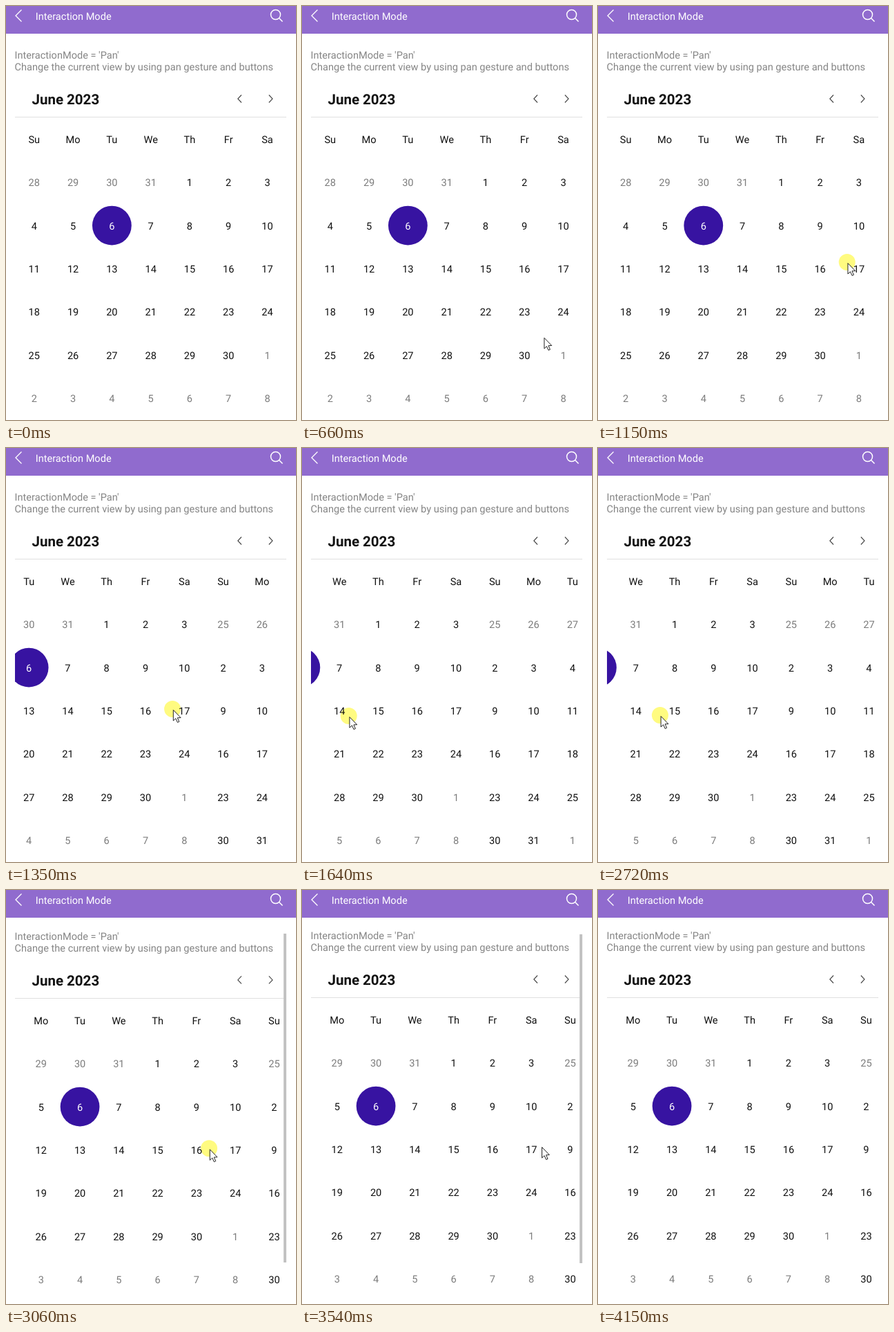
These frames come from a looping animation (420 px wide and 598 px high, 4.62 s). An HTML page with a canvas:

```html
<!DOCTYPE html>
<html lang="en">
<head>
<meta charset="utf-8">
<title>Calendar pan</title>
<style>
html, body { margin: 0; width: 100%; height: 100%; overflow: hidden; background: #fff; }
canvas { display: block; }
</style>
</head>
<body>
<canvas width="420" height="598"></canvas>
<script>
const ctx = document.querySelector('canvas').getContext('2d');
ctx.textRendering = 'geometricPrecision';

const LOOP = 4620, LEFT = 13, WIDTH = 393, COL = 56.28, ROW = 62.3;
const REGULAR = '14.57px Roboto, sans-serif', BOLD = 'bold 20.5px Roboto, sans-serif';
const INK = '#111', MUTED = '#7c7c7c', CAPTION = '#858585';
const ARROW = new Path2D('M.5 .5V16L4 12.7L6.6 18.4L9 17.3L6.5 11.8L11.3 11.6Z');

// Progress from 0 to 1 between two times
const ramp = (t, start, end) => Math.min(1, Math.max(0, (t - start) / (end - start)));

// Enter, drag left, return, drag right, leave
const pointerX = t => 341 + 21 * ramp(t, 380, 1010) - 354 * ramp(t, 1150, 1742)
  + 82 * ramp(t, 2150, 2580) + 257 * ramp(t, 2720, 3148) - 17 * ramp(t, 3670, 4150);
const pointerY = t => 597 - 206 * ramp(t, 380, 870) - 20 * ramp(t, 870, 1010)
  + 25 * ramp(t, 1150, 1870) - 9 * ramp(t, 2150, 2580) - 16 * ramp(t, 2720, 3148)
  + 229 * ramp(t, 3670, 4150);

// Each pan follows the pointer until vertical scrolling takes over the gesture
const panX = t => -155.5 * ramp(t, 1150, 1410) + 109.2 * ramp(t, 2720, 2902);
const scrollY = t => -5 * ramp(t, 2902, 3100);
const barAlpha = t => ramp(t, 2902, 2970) * (1 - ramp(t, 3700, 4000));

function text(str, x, y, color, align = 'left', font = REGULAR) {
  ctx.font = font;
  ctx.fillStyle = color;
  ctx.textAlign = align;
  ctx.fillText(str, x, y);
}

function disc(x, y, r, color) {
  ctx.fillStyle = color;
  ctx.beginPath();
  ctx.arc(x, y, r, 0, 2 * Math.PI);
  ctx.fill();
}

function box(x, y, w, h, color) {
  ctx.fillStyle = color;
  ctx.fillRect(x, y, w, h);
}

function stroke(path, color, width) {
  ctx.strokeStyle = color;
  ctx.lineWidth = width;
  ctx.stroke(new Path2D(path));
}

// Arrowhead with its tip at x, opening by dx and dy
function chevron(x, y, dx, dy, color, width) {
  stroke(`M${x + dx} ${y - dy}L${x} ${y}L${x + dx} ${y + dy}`, color, width);
}

function drawAppBar() {
  box(0, 0, 420, 40, '#906bce');
  chevron(14, 14, 8.5, 8.5, '#fff', 1.3);
  text('Interaction Mode', 42.7, 19.7, '#fff');
  stroke('M383.5 12.5a7 7 0 1 1 14 0a7 7 0 1 1 -14 0M395.5 17.5l5 5', '#fff', 1.5);
}

function drawMonth(month, left) {
  const startDay = new Date(2023, month, 1).getDay();
  ['Su', 'Mo', 'Tu', 'We', 'Th', 'Fr', 'Sa'].forEach((day, i) =>
    text(day, left + i * COL, 198.2, INK, 'center'));
  for (let i = 0; i < 42; i++) {
    const date = new Date(2023, month, 1 - startDay + i);
    const x = left + i % 7 * COL, y = 255.3 + Math.floor(i / 7) * ROW;
    const inMonth = date.getMonth() === month;
    const selected = inMonth && month === 5 && date.getDate() === 6;
    if (selected) disc(x, y - .5, 28.4, '#3713a1');
    text(date.getDate(), x, y + 5.1, selected ? '#fff' : inMonth ? INK : MUTED, 'center');
  }
}

function drawPage(t) {
  ctx.save();
  ctx.translate(0, scrollY(t));
  text("InteractionMode = 'Pan'", 12.6, 76.2, CAPTION);
  text('Change the current view by using pan gesture and buttons', 12.6, 93.2, CAPTION);
  text('June 2023', 37.5, 142.3, INK, 'left', BOLD);
  chevron(335.8, 134, 5.2, 5.5, '#444', 1.1);
  chevron(386, 134, -5.2, 5.5, '#444', 1.1);
  box(LEFT, 160, WIDTH, 1, '#e0e0e0');
  ctx.beginPath();
  ctx.rect(LEFT, 161, WIDTH, 450);
  ctx.clip();
  for (const page of [0, 1]) drawMonth(5 + page, 40.8 + panX(t) + page * 7 * COL);
  ctx.restore();

  ctx.globalAlpha = barAlpha(t);
  box(402, 59 - scrollY(t), 4, 475, '#c2c2c2');
  ctx.globalAlpha = 1;
}

function drawPointer(t) {
  if (t < 380 || t >= 4150) return;
  const pressed = (t >= 1010 && t < 1850) || (t >= 2580 && t < 3270);
  ctx.save();
  ctx.translate(pointerX(t), pointerY(t));
  if (pressed) {
    ctx.globalCompositeOperation = 'multiply';
    disc(-.7, -1, 12, '#fffb80');
    ctx.globalCompositeOperation = 'source-over';
  }
  ctx.fillStyle = '#fff';
  ctx.fill(ARROW);
  stroke(ARROW, '#222', 1);
  ctx.restore();
}

function frame() {
  const t = performance.now() % LOOP;
  box(0, 0, 420, 598, '#fff');
  drawPage(t);
  drawAppBar();
  drawPointer(t);
  requestAnimationFrame(frame);
}
frame();
</script>
</body>
</html>
```
